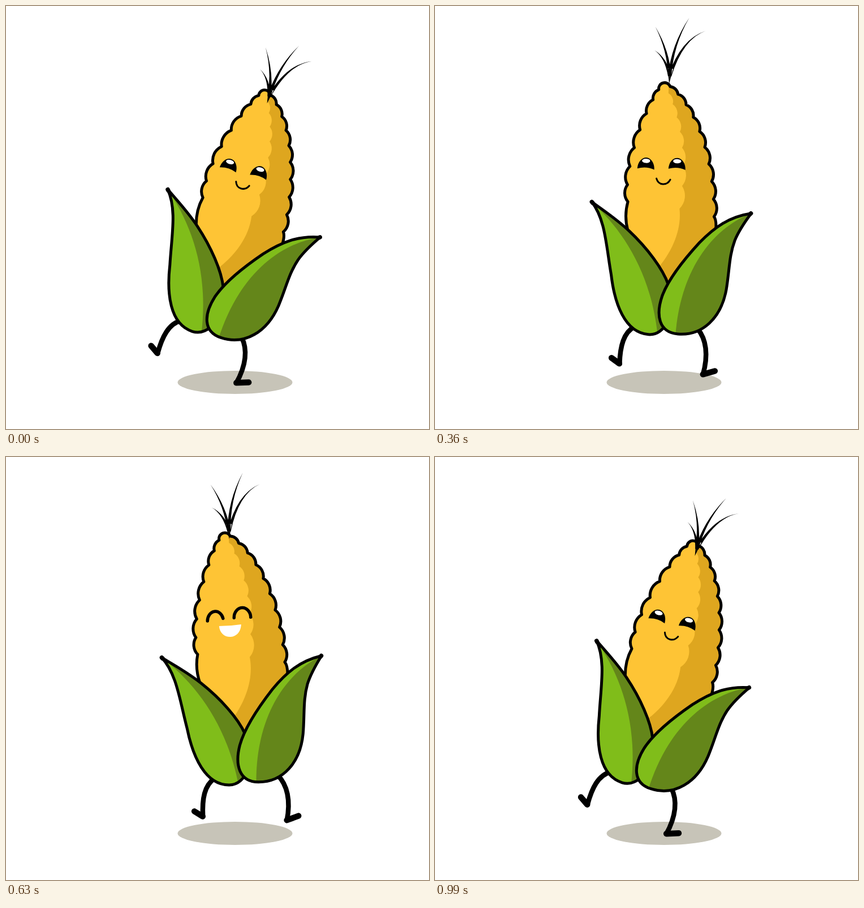
An HTML page for the animation above (1.26 s loop, 748 by 748 pixels).

```html
<!DOCTYPE html>
<html lang="en">
<head>
<meta charset="utf-8">
<title>Dancing corn</title>
<style>
  html, body { margin: 0; width: 100%; height: 100%; overflow: hidden; background: #fff; }
  svg { display: block; width: 100vw; height: 100vh; }
  .line { fill: none; stroke: #000; stroke-width: 5; stroke-linecap: round; stroke-linejoin: round; }
</style>
</head>
<body>
<svg viewBox="0 0 748 748">
  <defs>
    <clipPath id="cobClip"><path id="cob"/></clipPath>
    <clipPath id="leftClip">
      <path id="left" d="M275 354C302 383 307 430 320 480C330 530 352 580 394 580C426 580 440 535 422 489C410 462 380 428 345 400C320 380 297 368 275 354Z"/>
    </clipPath>
    <clipPath id="rightClip">
      <path id="right" d="M558 352C520 361 496 381 471 411C446 443 422 478 413 510C404 545 412 575 446 575C490 575 520 540 525 490C528 455 525 430 533 402C539 383 548 368 558 352Z"/>
    </clipPath>
  </defs>
  <ellipse cx="405" cy="665.5" rx="101.5" ry="20.5" fill="#c7c4b8"/>
  <g id="corn">
    <!-- legs -->
    <g class="line" style="stroke-width:8.5">
      <path d="M369 568C350 580 346 605 347.500 636"/>
      <path d="M480 563C497 580 503 608 496 643"/>
      <path d="M347 635.500L332.500 626.500M496 642.500L516.500 635" style="stroke-width:10.5"/>
    </g>
    <!-- cob -->
    <use href="#cob" fill="#fec435"/>
    <path id="shade" fill="#dea61f" clip-path="url(#cobClip)"/>
    <use href="#cob" class="line"/>
    <!-- silk -->
    <g transform="rotate(-2.43 376 373)"><path id="silk"/></g>
    <!-- calm face -->
    <g id="calm" transform="rotate(-2.43 376 373)">
      <g id="eye">
        <path d="M354.500 288A14.800 20 0 0 1 384.500 289Q370 283 354.500 288Z"/>
        <ellipse cx="369.500" cy="274" rx="7.200" ry="3.800" fill="#fff"/>
      </g>
      <use href="#eye" x="55" y="-1.500"/>
      <path class="line" style="stroke-width:3" d="M389 304.500C393 317 408 317 413.500 305.500"/>
    </g>
    <!-- happy face -->
    <g id="happy">
      <g class="line" style="stroke-width:5.5">
        <path d="M356.500 290A14 17 0 0 1 384 285.500"/>
        <path d="M403.500 284.500A14.500 17 0 0 1 433 283.500"/>
      </g>
      <path fill="#fff" d="M377 299Q396 299 416 296C415 325 379 325 377 299Z"/>
    </g>
    <!-- leaves -->
    <use href="#left" fill="#80bd1a"/>
    <path fill="#64861a" clip-path="url(#leftClip)"
      d="M275 354C334 400 390 470 411 582L470 582L440 460L345 380Z"/>
    <use href="#left" class="line"/>
    <use href="#right" fill="#80bd1a"/>
    <path fill="#64861a" clip-path="url(#rightClip)"
      d="M558 352C490 385 440 465 442 582L560 582L560 352Z"/>
    <use href="#right" class="line"/>
    <path class="line" style="stroke-width:7.5" d="M275.500 354.500L277 356M557.500 352L556 353.500"/>
  </g>
</svg>
<script>
const $ = id => document.getElementById(id);
const STEP = 30, LOOP = 1260, PEAK = 15, TURN = 19, LAST = 33;
const mix = (a, b, k) => a + (b - a) * k;

// Points along a cubic curve, spaced wider towards its end.
function spread(count, a, b, c, d) {
  return Array.from({ length: count + 1 }, (_, i) => {
    const t = (i / count) ** 1.1, s = 1 - t;
    return [0, 1].map(k =>
      s ** 3 * a[k] + 3 * s * s * t * b[k] + 3 * s * t * t * c[k] + t ** 3 * d[k]);
  });
}

// Joins points with round kernels bulging to the outside.
function kernels(points) {
  return points.slice(1).map(([x, y], i) => {
    const r = 0.8 * Math.hypot(x - points[i][0], y - points[i][1]);
    return `A${r} ${r} 0 0 1 ${x} ${y}`;
  }).join('');
}

// A hair that widens from its tip to the shared root.
function hair(x, y, cx, cy) {
  return `M${x} ${y}Q${cx + 2} ${cy} 408.5 118L402.500 118Q${cx - 2} ${cy} ${x} ${y}Z`;
}

const leftRim = spread(7, [377.5, 147], [353, 195], [327, 290], [339, 349]).reverse();
const rightRim = spread(9, [397, 140], [456, 182], [486, 280], [493, 363]);
const shadeRim = spread(7, [395, 152], [422, 205], [437, 262], [431, 354]);

$('cob').setAttribute('d', 'M343 400Q334 374 339 349' + kernels(leftRim) +
  'A10.400 10.400 0 0 1 397 140' + kernels(rightRim) +
  'Q498 369 498 385L470 470L420 520L370 470Z');
$('shade').setAttribute('d', 'M394 130L395 152' + kernels(shadeRim) +
  'C438 390 425 430 400 464L425 525L530 400L530 130Z');
$('silk').setAttribute('d', hair(377, 30, 402, 72) + hair(437, 12, 408, 62) +
  hair(467, 34.5, 425, 50) + hair(377, 72, 398, 85) + 'M401 104L405 131L411 104Z');

function draw(ms) {
  const n = Math.min(LAST, Math.floor(ms % LOOP / STEP));

  // The whole body swings left, then back.
  const angle = n < TURN
    ? mix(17.9, -3.1, n / TURN)
    : mix(-3.1, 17.55, (n - TURN) / (LAST - TURN));
  $('corn').setAttribute('transform', `rotate(${angle} 376 373)`);

  // The silk rises out of the cob and sinks again.
  const low = n < PEAK
    ? mix(0.86, 0, n / PEAK)
    : Math.min(0.97, (n - PEAK) / 12);
  $('silk').setAttribute('transform',
    `translate(405 ${131 + 30 * low}) rotate(${-1.8 * low}) scale(${1 - 0.06 * low}) translate(-405 -131)`);

  const glad = n >= TURN && n < LAST;
  $('happy').style.display = glad ? '' : 'none';
  $('calm').style.display = glad ? 'none' : '';
}

const start = performance.now();
function tick() {
  draw(performance.now() - start);
  requestAnimationFrame(tick);
}
tick();
</script>
</body>
</html>
```
